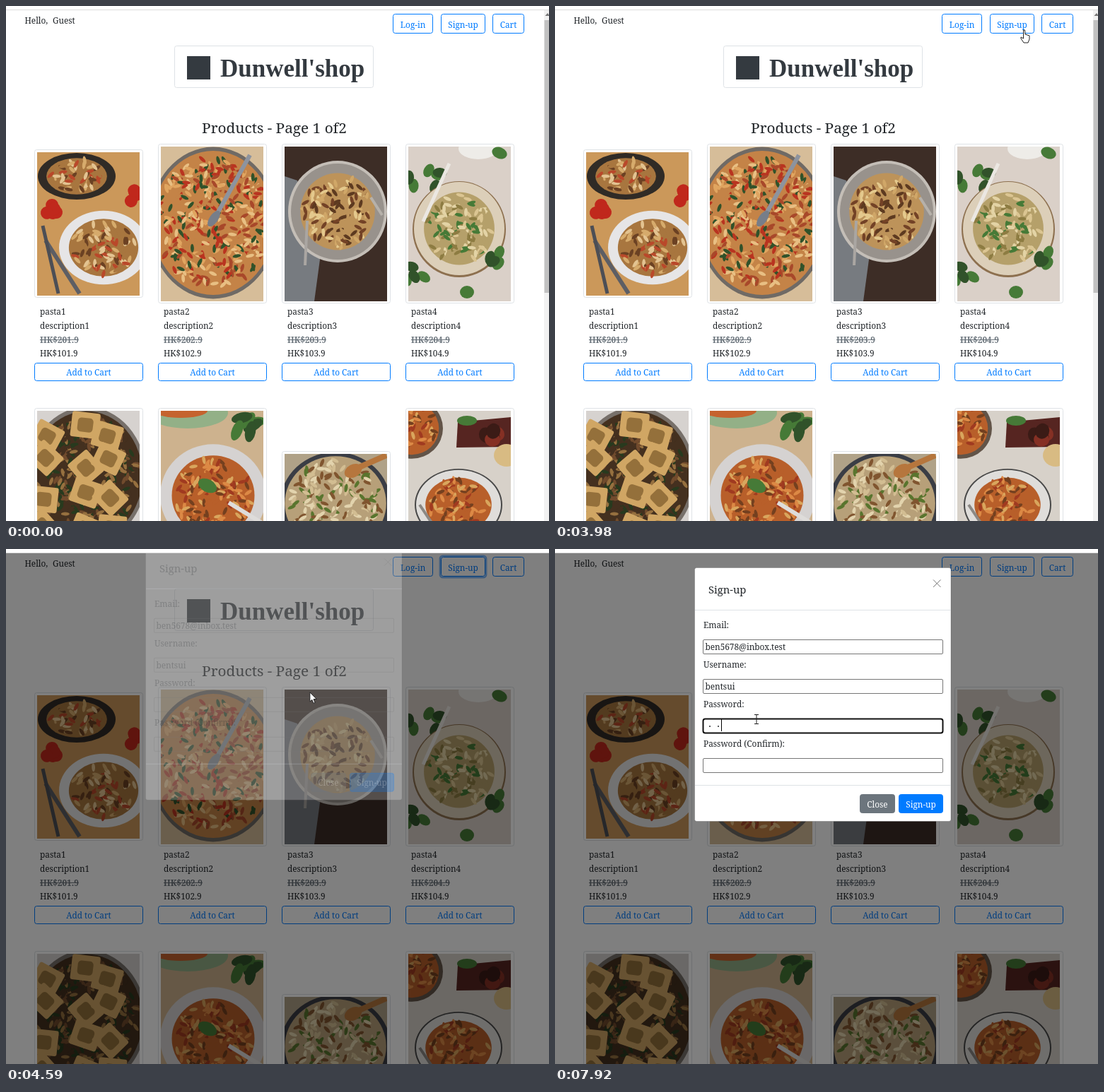
An HTML page with a canvas that plays this animation: 768x729 px, repeating every 8 s.

```html
<!DOCTYPE html>
<html lang="en">
<head>
<meta charset="utf-8">
<title>Shop sign-up</title>
<style>
html, body { margin: 0; height: 100%; overflow: hidden; background: #fff; }
canvas { display: block; }
</style>
</head>
<body>
<canvas id="stage" width="768" height="729"></canvas>
<script>
const W = 768, H = 729, LOOP = 8000;
const BLUE = '#007bff', INK = '#212529', GREY = '#6c757d', LINE = '#dee2e6';
const SERIF = '"Noto Serif", "Liberation Serif", serif';
const TIMES = '"Liberation Serif", serif';
const view = document.getElementById('stage').getContext('2d');
let g = view;

const clamp = (v, a = 0, b = 1) => Math.min(b, Math.max(a, v));
const ramp = (t, start, length) => clamp((t - start) / length);
const mix = (a, b, p) => a + (b - a) * p;

function text(s, x, y, { size = 11.8, color = INK, align = 'left', weight = 400, font = SERIF } = {}) {
  g.font = `${weight} ${size}px ${font}`;
  g.fillStyle = color;
  g.textAlign = align;
  g.fillText(s, x, y);
  return g.measureText(s).width;
}

function box(x, y, w, h, { fill, stroke, r = 3, lw = 1 } = {}) {
  g.beginPath();
  g.roundRect(x, y, w, h, r);
  if (fill) { g.fillStyle = fill; g.fill(); }
  if (stroke) { g.strokeStyle = stroke; g.lineWidth = lw; g.stroke(); }
}

function button(label, x, y, w, h, baseline, color, fill) {
  box(x, y, w, h, { stroke: fill || color, fill });
  text(label, x + w / 2, baseline, { color, align: 'center' });
}

function oval(x, y, rx, ry, color, turn = 0) {
  g.beginPath();
  g.ellipse(x, y, rx, ry, turn, 0, 7);
  g.fillStyle = color;
  g.fill();
}

function poly(color, ...pts) {
  g.beginPath();
  for (let i = 0; i < pts.length; i += 2) g.lineTo(pts[i], pts[i + 1]);
  g.closePath();
  g.fillStyle = color;
  g.fill();
}

function bar(color, lw, x1, y1, x2, y2) {
  g.beginPath();
  g.moveTo(x1, y1);
  g.lineTo(x2, y2);
  g.strokeStyle = color;
  g.lineWidth = lw;
  g.stroke();
}

// Seeded flat ovals spread over a disc; slim sets their width to length ratio
function pieces(n, x, y, r, colors, size, slim = .5, tall = 1) {
  let seed = n * 97 + x + y;
  const rnd = () => (seed = (seed * 16807 + 11) % 2147483647) / 2147483647;
  for (let i = 0; i < n; i++) {
    const a = rnd() * 6.28, d = r * Math.sqrt(rnd());
    oval(x + d * Math.cos(a), y + d * tall * Math.sin(a), size, size * slim, colors[i % colors.length], rnd() * 3);
  }
}

function dish(x, y, r, tall, rim, colors, part = .78) {
  const inner = r * part;
  oval(x, y, r, r * tall, rim);
  oval(x, y, inner, inner * tall, colors[0]);
  pieces(Math.round(inner * inner * tall / 22), x, y, inner * .92, colors, 6, .4, tall);
}

const backdrop = color => { g.fillStyle = color; g.fillRect(0, 0, 145, 219); };

function ravioli() {
  for (let i = 0; i < 12; i++) {
    g.save();
    g.translate(14 + i % 3 * 46 + 9 * Math.sin(i * 2), 28 + Math.floor(i / 3) * 46 + 8 * Math.cos(i * 3));
    g.rotate(.5 + .4 * Math.sin(i * 5));
    box(-20, -18, 40, 36, { fill: '#d0a664' });
    box(-11, -10, 22, 20, { fill: '#94703b', r: 5 });
    g.restore();
  }
}

const RED = '#b93420', TOMATO = ['#c0281c'], LEAF = ['#467a37', '#31522a'];
const PENNE = ['#a8763f', '#d6ab6c', '#6b4123', '#b9482a', '#e3c391'];
const SPAGHETTI = ['#c48347', '#e8bf83', RED, '#31522a', '#e0a560', '#a8482a'];
const RAGU = ['#bd935a', '#e4c98d', '#5d3a20', '#d0a768', '#734226'];
const HERBS = ['#b5a06a', '#dbc592', '#467a37', '#8d7c42', '#e3d3a5'];
const RICE = ['#b85f2a', '#dc8945', '#a03a20', '#d9a65d', '#74401f'];
const MUSHROOM = ['#b7a079', '#e2d3ad', '#80552f', '#d2bd92', '#59752e'];

// Each photo: vertical inset, painter
const photos = [
  [8, () => {
    backdrop('#cb985a');
    dish(56, 34, 55, .6, '#302b26', PENNE);
    pieces(4, 128, 60, 13, TOMATO, 9, 1);
    pieces(5, 22, 86, 13, TOMATO, 9, 1);
    dish(94, 135, 63, .83, '#e6e5e6', PENNE);
    bar('#5d5e64', 6, 12, 125, 60, 200);
    bar('#4c4e55', 5, 8, 104, 30, 200);
  }],
  [0, () => {
    backdrop('#d6bd99');
    dish(74, 108, 91, 1.18, '#6f6a65', SPAGHETTI, .95);
    bar('#8d939e', 6, 126, 12, 78, 98);
    oval(75, 102, 6, 13, '#777e89', .6);
  }],
  [0, () => {
    backdrop('#3d2d26');
    poly('#777b80', 0, 42, 18, 48, 50, 160, 42, 219, 0, 219);
    oval(75, 92, 70, 72, '#c4beb7');
    dish(75, 92, 66, 1.03, '#98928c', RAGU, .8);
    bar('#aaa6a2', 4, 32, 105, 29, 168);
    bar('#b6b1aa', 4, 122, 72, 138, 97);
  }],
  [0, () => {
    backdrop('#dad0c8');
    oval(99, 3, 28, 15, '#eeece8');
    pieces(6, 22, 40, 24, LEAF, 10, .7);
    pieces(4, 10, 184, 16, LEAF, 10, .7);
    oval(72, 117, 66, 68, '#8d704f');
    dish(72, 116, 64, 1.03, '#dccfb9', HERBS);
    pieces(4, 124, 150, 16, LEAF, 10, .7);
    oval(129, 9, 11, 8, LEAF[0], .4);
    oval(83, 206, 10, 9, LEAF[0]);
    bar('#ebe7e2', 5, 58, 24, 21, 106);
  }],
  [0, () => {
    backdrop('#d6d2cf');
    dish(70, 92, 84, 1.16, '#77706a', ['#44301f', '#714b2d', '#283a1e', '#96703f'], .94);
    ravioli();
  }],
  [0, () => {
    backdrop('#cdb28e');
    oval(38, 3, 57, 22, '#93b087');
    oval(28, 0, 38, 10, '#c5632e');
    pieces(6, 120, 16, 20, LEAF, 15, .5);
    dish(74, 120, 75, .97, '#d5d2d1', RICE);
    oval(66, 106, 14, 9, LEAF[0], .5);
    bar('#dedcda', 6, 96, 130, 145, 160);
  }],
  [61, () => {
    backdrop('#b0a288');
    dish(72, 70, 78, .93, '#3a3d45', MUSHROOM, .92);
    bar('#b6763d', 8, 144, 2, 103, 20);
    oval(97, 24, 13, 9, '#b6763d', -.5);
  }],
  [0, () => {
    backdrop('#d7d1c9');
    dish(5, 25, 44, .97, '#625448', RICE, .87);
    poly('#562521', 70, 16, 145, 9, 145, 51, 68, 52);
    pieces(6, 111, 32, 24, ['#853024', '#3b1b16'], 11, .9, .4);
    oval(83, 14, 14, 7, LEAF[0]);
    oval(139, 63, 18, 16, '#d8bb83');
    oval(71, 133, 62, 51, '#474747');
    dish(71, 133, 60, .82, '#dfddda', RICE);
    bar('#8b8884', 4, 16, 133, 34, 160);
  }]
];

function greeting(color) {
  text('Hello,', 26.5, 25, { color });
  text('Guest', 66, 25, { color });
}

function drawProduct([inset, paint], i) {
  const row = Math.floor(i / 4), x = 44 + i % 4 * 175;
  const y = 199 + row * 374 + inset, h = 219 - inset * 2;
  box(x - 3.5, y - 3.5, 153, h + 6, { stroke: LINE });
  g.save();
  g.beginPath();
  g.rect(x, y, 145, h);
  g.clip();
  g.translate(x, y);
  paint();
  g.restore();
  if (row) return;
  const n = i + 1, left = x + 4;
  text('pasta' + n, left, 437);
  text('description' + n, left, 457);
  const w = text(`HK$20${n}.9`, left, 477, { weight: 700, color: GREY });
  g.fillRect(left, 472, w, 1);
  text(`HK$10${n}.9`, left, 496);
  button('Add to Cart', x - 3.5, 505.5, 153, 25, 523, BLUE);
}

function drawPage() {
  g.fillStyle = '#fff';
  g.fillRect(0, 0, W, H);
  g.fillStyle = '#dcdcdc';
  g.fillRect(0, 5, W, 1);
  greeting(INK);
  button('Log-in', 547.5, 11.5, 56, 27, 31, BLUE);
  button('Sign-up', 615.5, 11.5, 62, 27, 31, BLUE);
  button('Cart', 688.5, 11.5, 44, 27, 31, BLUE);
  box(238.5, 56.5, 281, 59, { stroke: LINE });
  box(256, 71, 33, 33, { fill: '#343a40', r: 0 });
  text("Dunwell'shop", 303, 100, { size: 35, weight: 700, font: TIMES, color: '#343a40' });
  text('Products - Page 1 of2', 379.5, 180, { size: 20.8, align: 'center' });
  photos.forEach(drawProduct);
}

const pageCanvas = document.createElement('canvas');
pageCanvas.width = W;
pageCanvas.height = H;
g = pageCanvas.getContext('2d');
drawPage();
g = view;

// The picture advances in steps of about 77 ms, with a short rest after each burst
const STEP = 77;
const bursts = [
  [130, 900], [980, 1670], [1820, 2590], [2740, 3510], [3740, 4130],
  [4360, 5130], [5210, 5970], [6050, 6820], [6900, 7050]
];

function hold(t) {
  const burst = bursts.findLast(b => t >= b[0]);
  if (!burst) return 0;
  const [from, to] = burst;
  if (to === 7050 && t > to) return t;
  return Math.min(to, from + STEP * Math.floor((t - from) / STEP + .1));
}

// Pointer key points: time, x, y
const moves = [
  [130, 667, 591], [900, 53, 19], [1180, 35, 19], [1670, 107, 19], [2130, 29, 20], [2590, 77, 20],
  [3510, 692, 86], [3970, 664, 34], [4360, 664, 34], [4513, 604, 52], [4590, 430, 203],
  [5130, 354, 156], [5360, 340, 139], [6300, 318, 194], [6820, 288, 244], [7050, 285, 241]
];

function pointerAt(t) {
  const i = moves.findLastIndex(m => t >= m[0]);
  if (i < 0) return null;
  const a = moves[i], b = moves[i + 1] || [LOOP, a[1], a[2]];
  const p = ramp(t, a[0], b[0] - a[0]);
  return { x: mix(a[1], b[1], p), y: mix(a[2], b[2], p) };
}

function pointerShape({ x, y }, t) {
  const overText = x < 100 && y < 30, overField = t > 5200 && (y - 128) % 56 < 22;
  if (overText || overField) return 'beam';
  return x > 615 && x < 678 && y < 40 ? 'hand' : 'arrow';
}

const outlines = {
  arrow: [0, 0, 0, 13, 3, 10.5, 5, 15.5, 7.2, 14.5, 5.2, 9.7, 9.3, 9.5],
  hand: [-1.5, 0, .5, 0, 1, 6, 7, 8, 7, 13, 5, 18, -1, 18, -5, 12, -5, 10, -1.5, 12]
};

function drawPointer(pointer, t) {
  const shape = pointerShape(pointer, t);
  g.save();
  g.translate(pointer.x, pointer.y);
  if (shape === 'beam') {
    bar('#222', 1, 0, -6, 0, 6);
    for (const y of [-6.5, 6.5]) bar('#222', 1, -3, y, 3, y);
  } else {
    poly('#fff', ...outlines[shape]);
    g.strokeStyle = '#222';
    g.lineWidth = 1;
    g.stroke();
  }
  g.restore();
}

// Two drags across the greeting: the first from its second letter, the second from its start
function drawSelection(t, x) {
  const from = t < 1820 ? 35 : 26;
  if (t < 1180 || t >= 3740 || (t >= 1820 && t < 2130)) return;
  g.save();
  g.beginPath();
  g.rect(from, 11, clamp(x, from, 98) - from, 17);
  g.clip();
  g.fillStyle = '#3390ff';
  g.fillRect(0, 0, 120, 40);
  greeting('#fff');
  g.restore();
}

function drawSignUpButton(t) {
  g.globalAlpha = .5 * ramp(t, 4340, 100) * (1 - ramp(t, 4850, 150));
  box(613.8, 9.8, 65.4, 30.4, { stroke: BLUE, lw: 2.4, r: 4 });
  g.globalAlpha = ramp(t, 3990, 130) * (1 - ramp(t, 4440, 150));
  button('Sign-up', 615.5, 11.5, 62, 27, 31, '#fff', BLUE);
  g.globalAlpha = 1;
}

function drawScrollbar() {
  g.fillStyle = '#f1f1f1';
  g.fillRect(761, 6, 7, H);
  g.fillStyle = '#c1c1c1';
  g.fillRect(761.5, 20, 6.5, 386);
  poly('#777', 762.5, 14, 766, 10, 769, 14);
}

const fields = [['Email:', 'ben5678@inbox.test'], ['Username:', 'bentsui'], ['Password:', ''], ['Password (Confirm):', '']];
const focusTimes = [5360, 6300, 6870];

function drawField([label, value], i, t) {
  const y = 128 + i * 56, focused = i === focusTimes.findLastIndex(f => t >= f);
  const typed = i === 2 ? (t >= 7750) + (t >= 7920) : 0;
  text(label, 210, y - 16);
  box(209.5, y + .5, 339, 20, focused ? { stroke: '#101010', lw: 2 } : { stroke: '#767676', r: 1.5 });
  const width = text(value, 212.5, y + 15);
  for (let k = 0; k < typed; k++) oval(219 + k * 12, y + 11, 1, 1, INK);
  if (focused && (typed || (t - focusTimes[i]) % 1000 < 500)) {
    g.fillStyle = '#000';
    g.fillRect(212 + Math.round(width) + typed * 11.5, y + 1, 1, 17);
  }
}

function drawModal(t) {
  const age = t - 4555;
  if (age < 0) return;
  g.save();
  g.beginPath();
  g.rect(0, 6, W, H);
  g.clip();
  g.globalAlpha = clamp(age / 150);
  g.translate(0, -38 * (1 - clamp(age / 300)) ** 1.8);
  box(197.5, 26.5, 362.5, 359, { fill: '#fff', stroke: 'rgba(0,0,0,.2)' });
  text('Sign-up', 217, 63, { size: 14.8 });
  bar('#777', 1, 535, 43.5, 545.5, 54);
  bar('#777', 1, 545.5, 43.5, 535, 54);
  for (const y of [86.5, 334.5]) bar(LINE, 1, 198, y, 560, y);
  fields.forEach((field, i) => drawField(field, i, t));
  button('Close', 431.5, 347.5, 49, 26, 365.5, '#fff', GREY);
  button('Sign-up', 486.5, 347.5, 62, 26, 365.5, '#fff', BLUE);
  g.restore();
}

function render(now) {
  const t = hold(now % LOOP), pointer = pointerAt(t);
  g.drawImage(pageCanvas, 0, 0);
  if (pointer) drawSelection(t, pointer.x);
  drawSignUpButton(t);
  if (t < 4410) drawScrollbar();
  g.fillStyle = `rgba(0,0,0,${.5 * ramp(t, 4410, 150)})`;
  g.fillRect(0, 6, W, H);
  drawModal(t);
  if (pointer) drawPointer(pointer, t);
}

const start = performance.now();
function tick() {
  render(performance.now() - start);
  requestAnimationFrame(tick);
}
tick();
</script>
</body>
</html>
```
